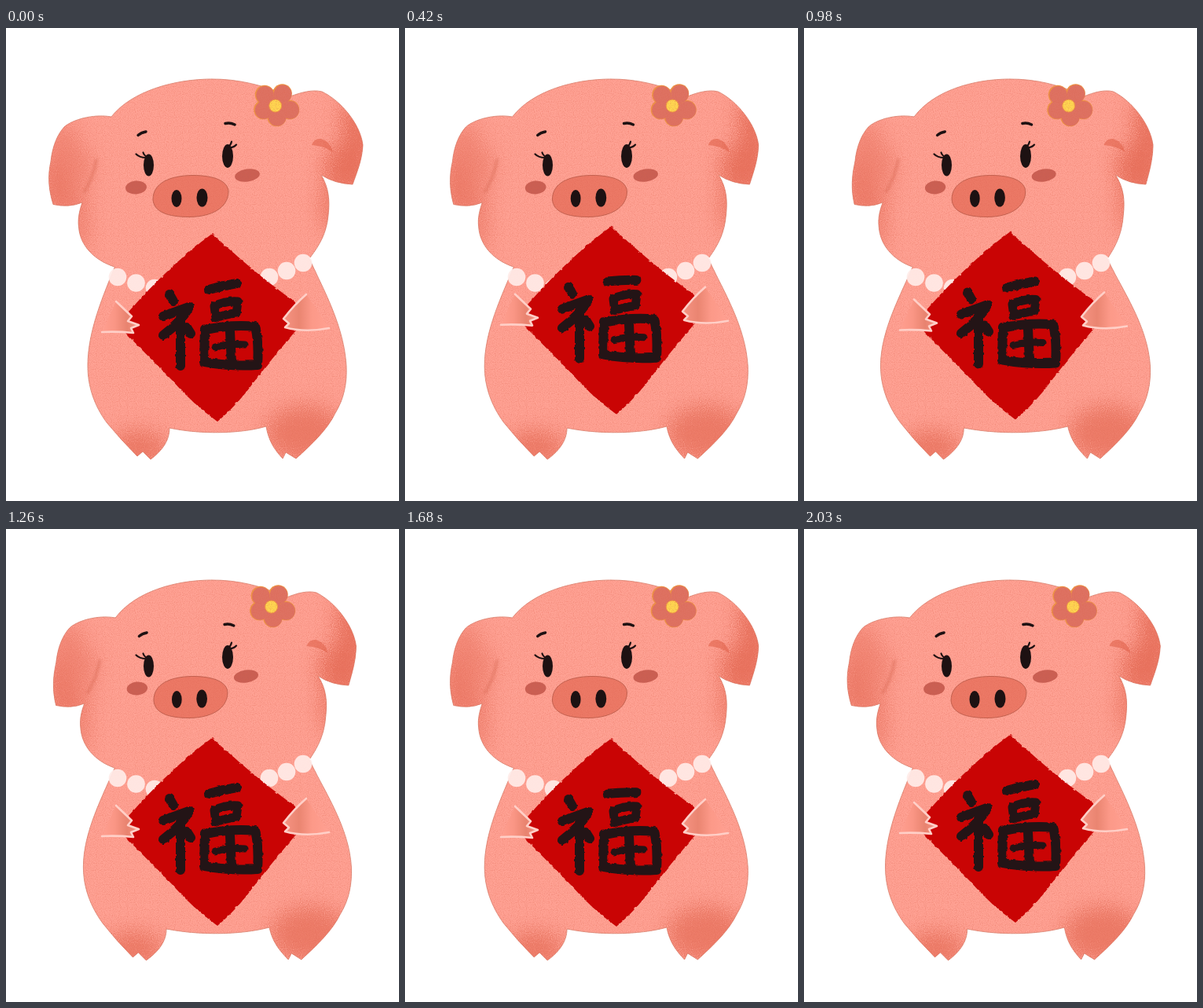
These frames come from a looping animation (500x602 px, 2.1 s). An HTML page:

```html
<!DOCTYPE html>
<html lang="zh">
<head>
<meta charset="utf-8">
<title>福</title>
<style>
  html, body { margin: 0; width: 100%; height: 100%; overflow: hidden; background: #fff; }
  svg { display: block; width: 500px; height: 602px; }
  .skin { fill: #ffa294; stroke: #dd8877; stroke-width: .9; }
  .line { fill: none; stroke-linecap: round; stroke-linejoin: round; }
  .dark { fill: #1d1112; }
  .lash { stroke: #1d1112; stroke-width: 2.2; }
  .ink { stroke: #231416; stroke-width: 12; }
  .edge { stroke: #ffcfc7; stroke-width: 2.6; }
  .shade { fill: #e2634c; }
</style>
</head>
<body>
<svg viewBox="0 0 500 602">
  <defs>
    <filter id="grain" x="0" y="0" width="500" height="602" filterUnits="userSpaceOnUse" color-interpolation-filters="sRGB">
      <feTurbulence type="fractalNoise" baseFrequency=".9" numOctaves="1" seed="4"/>
      <feColorMatrix values="0 0 0 0 .86  0 0 0 0 .38  0 0 0 0 .3  .9 0 0 0 -.39"/>
      <feComposite in2="SourceAlpha" operator="in" result="specks"/>
      <feMerge><feMergeNode in="SourceGraphic"/><feMergeNode in="specks"/></feMerge>
    </filter>
    <filter id="stipple" x="0" y="0" width="500" height="602" filterUnits="userSpaceOnUse" color-interpolation-filters="sRGB">
      <feGaussianBlur in="SourceGraphic" stdDeviation="11" result="soft"/>
      <feTurbulence type="fractalNoise" baseFrequency=".9" numOctaves="1" seed="9" result="noise"/>
      <feDisplacementMap in="soft" in2="noise" scale="60" xChannelSelector="R" yChannelSelector="G"/>
    </filter>
    <filter id="soft" x="-50%" y="-50%" width="200%" height="200%"><feGaussianBlur stdDeviation="1.6"/></filter>
    <filter id="rough" x="100" y="200" width="320" height="340" filterUnits="userSpaceOnUse" color-interpolation-filters="sRGB">
      <feTurbulence type="fractalNoise" baseFrequency=".2" numOctaves="1" seed="3"/>
      <feDisplacementMap in="SourceGraphic" scale="3.5" xChannelSelector="R" yChannelSelector="G"/>
    </filter>
    <path id="body"/>
    <path id="head"/>
    <clipPath id="inBody"><use href="#body"/></clipPath>
    <clipPath id="inHead"><use href="#head"/></clipPath>
    <linearGradient id="leftHand" x1="122" x2="168" y1="0" y2="0" gradientUnits="userSpaceOnUse">
      <stop offset="0" stop-color="#ff9f90"/><stop offset=".35" stop-color="#fa9685"/><stop offset=".7" stop-color="#e8836f"/><stop offset="1" stop-color="#f4907f"/>
    </linearGradient>
    <linearGradient id="rightHand" x1="354" x2="408" y1="0" y2="0" gradientUnits="userSpaceOnUse">
      <stop offset="0" stop-color="#f69382"/><stop offset=".35" stop-color="#ea8571"/><stop offset=".65" stop-color="#fc9988"/><stop offset="1" stop-color="#ff9f90"/>
    </linearGradient>
  </defs>

  <g filter="url(#grain)">
    <use href="#body" class="skin"/>
    <g clip-path="url(#inBody)">
      <g class="shade" filter="url(#stipple)">
        <ellipse id="legL" cx="168" cy="536" rx="38" ry="24" opacity=".6"/>
        <ellipse id="legR" cx="380" cy="516" rx="50" ry="36" opacity=".6"/>
      </g>
    </g>
    <use href="#head" class="skin"/>
    <g clip-path="url(#inHead)">
      <g class="shade" filter="url(#stipple)">
        <g id="earL">
          <path d="M50 130L84 118L96 150L112 168L98 226L50 240Z" opacity=".4"/>
          <path d="M48 170L70 165L78 232L48 238Z" opacity=".4"/>
        </g>
        <path id="earR" d="M425 92L470 110L460 212L410 200L404 168L430 140Z" opacity=".75"/>
        <ellipse cx="92" cy="252" rx="12" ry="36" opacity=".5"/>
        <ellipse cx="414" cy="228" rx="14" ry="34" opacity=".55"/>
      </g>
      <path id="foldL" class="line" d="M115 168Q111 190 100 208" stroke="#dd6f5c" stroke-width="4" opacity=".5" filter="url(#soft)"/>
      <path id="foldR" class="shade" d="M389 149Q392 140 401 141Q413 145 416 158Q405 150 389 149Z" opacity=".6"/>
    </g>
    <g class="squeeze">
      <g fill="#c95f53">
        <ellipse cx="165.500" cy="203" rx="13.500" ry="8.500" transform="rotate(-5 165.500 203)"/>
        <ellipse cx="307" cy="187.500" rx="16" ry="8" transform="rotate(-8 307 187.500)"/>
      </g>
      <path d="M187 218C187 198 207 188 237 187.500C266 187.500 283 195 283 209C282 229 262 240 234 240.500C205 240.500 188 234 187 218Z" fill="#ec7966" stroke="#c0604f"/>
    </g>
    <g id="flower"></g>
  </g>

  <g class="squeeze">
    <ellipse class="dark" cx="217" cy="217" rx="6.500" ry="11"/>
    <ellipse class="dark" cx="249.500" cy="216" rx="7" ry="11.500"/>
    <g class="line" stroke="#1d1112" stroke-width="3.400">
      <path d="M168 136.500Q172 133 178 132"/>
      <path d="M279 121.500Q285 120 291 123"/>
    </g>
  </g>
  <g id="open">
    <ellipse class="dark" cx="181.500" cy="174.500" rx="6.500" ry="14"/>
    <ellipse class="dark" cx="282" cy="163" rx="7" ry="15"/>
    <g class="line lash">
      <path d="M165.500 160.500Q170 165 178 165M174.500 158.500Q176 163 180 164"/>
      <path d="M285 152Q290 152 293 148.500M283 151Q286 149 287 144.500"/>
    </g>
  </g>
  <g id="shut" class="line lash">
    <path d="M172 183Q181 177 193 179M167 176Q171 180 177 180M173 174Q175 178 180 179M181 173L181 178"/>
    <path d="M273 167Q283 163 300 167M285 164Q289 163 289 159M290 164Q294 163 295 159M295 165Q299 165 301 162"/>
  </g>

  <g id="pearls" fill="#ffebe8" fill-opacity=".92"></g>

  <g id="sign">
    <path d="M262 262C286 283 323 317 367 348L381 371Q335 424 306 463Q288 485 269 501Q236 477 210 447Q180 417 148 384L156 361Q211 299 262 262Z" fill="#c90404" filter="url(#rough)"/>
    <g class="line ink" filter="url(#rough)">
      <path d="M208 339L213 348"/>
      <path d="M200 367L233 355Q224 373 200 391M222 372L222 430M230 381L235 389"/>
      <path id="bar" d="M258 333Q275 328 294 325"/>
      <path d="M265 354Q279 347 295 348L293 363Q280 364 267 369L265 354" stroke-width="11"/>
      <path d="M253 383L252 425M254 384Q288 377 317 380Q322 400 320 429Q285 431 252 425M285 386L287 426"/>
      <path d="M266 406Q286 401 304 403" stroke-width="9"/>
    </g>
    <path d="M122 387L140 348L160 367L155 373L169 378L159 382L162 388Z" fill="url(#leftHand)"/>
    <path class="line edge" d="M140 348L160 367L155 373L169 378L159 382L162 388Q141 386 122 387"/>
    <path d="M382 339L356 367L353 371L360 376L355 381Q380 388 411 382Z" fill="url(#rightHand)"/>
    <path class="line edge" d="M382 339Q367 352 353 370L360 376L355 381Q380 388 411 382"/>
  </g>
</svg>
<script>
const $ = id => document.getElementById(id);
const STEP = 70, COUNT = 30;

// "x~d" is a coordinate that shifts by d at full squeeze.
const HEAD = `M138 304 C111~2 295 94~3 276 92.500~3 253 C91~3 242 94~3 231 97~3.500 222
  Q80~4 229 60~4.500 224.500 C54~6 205 53~8.500 188 57~8.500 170 C59~8.500 151 65~8.500 136 74~8.500 126
  C84~8 117 110~7 109 134~6.500 113 C160~5 80 215 65 262 65 C295 65 325 72 362~-6 87
  C375~-7 82 390~-8 78 402~-9 81 C427~-10 93 451~-11 123 454~-10.700 149 C453~-10 168 447~-8 182 441~-6.500 199
  Q418~-6 198 401~-5 187 C411~-4 204 412~-4 220 410~-4 238 C408~-3.500 260 400~-2 275 387 292`;
const BODY = `M150 280 L140 300 C124~-1 340 104~-7 385 104~-7 430 C104~-7 456 112~-6 480 128~-6 502
  Q146~-7 524 167~-7 545 L174~-7 539 L184~-7 549 C200~-6 537 208~-5 524 208~-5 509
  C245 517 297 517 331~5 507 C334~6 525 341~8 536 352~9 548 L356~9 540 L369~8.500 548
  C390~8 529 409~8 511 419~8 490 C430~8 472 434~8 452 433~8 430 C430~8 380 405~1 335 388 298 L378 280`;
const LIFT = [[0, 0], [3, -5], [6, -9.300], [8, -11.300], [10, -11], [14, -2.500], [18, 4], [21, 5.300], [24, 5], [29, 0], [30, 0]];

const morph = (path, p) => path.replace(/([\d.]+)~(-?[\d.]+)/g, (_, x, d) => (+x + d * p).toFixed(2));
const circle = (x, y, r, more = '') => `<circle cx="${x}" cy="${y}" r="${r}" ${more}/>`;
const shift = (id, x, y = 0) => $(id).setAttribute('transform', `translate(${x.toFixed(2)} ${y.toFixed(2)})`);

function lookup(table, f) {
  const i = table.findIndex(k => k[0] > f);
  const [a, u] = table[i - 1], [b, v] = table[i];
  return u + (v - u) * (f - a) / (b - a);
}

$('pearls').innerHTML = [[142, 317], [165.500, 324.500], [189, 331], [335, 317], [357, 309], [378, 299]]
  .map(([x, y]) => circle(x, y, 11.300)).join('');

const petals = [[329, 85], [351.500, 83.500], [361, 104], [344.500, 113], [327.500, 104]];
$('flower').innerHTML =
  petals.map(([x, y]) => circle(x, y, 12.300, 'fill="#ee9545"')).join('') +
  petals.map(([x, y]) => circle(x + .6, y + .4, 11.300, 'fill="#de7262"')).join('') +
  circle(343, 99, 12, 'fill="#de7262"') + circle(342.700, 99, 8, 'fill="#ffd850" stroke="#ee9545"');

function draw(f) {
  const p = 1 - Math.abs(f - 15) / 15;
  $('head').setAttribute('d', morph(HEAD, p));
  $('body').setAttribute('d', morph(BODY, p));
  const k = 1 - .026 * p;
  for (const part of document.querySelectorAll('.squeeze'))
    part.setAttribute('transform', `translate(${(232 * (1 - k)).toFixed(2)} 0) scale(${k.toFixed(4)} 1)`);
  shift('flower', -6.400 * p);
  shift('earL', 7 * p);
  shift('foldL', 5 * p);
  shift('earR', -9 * p);
  shift('foldR', -8 * p);
  shift('legL', -7 * p);
  shift('legR', 8 * p);
  shift('sign', 0, lookup(LIFT, f));
  const flat = f > 3 && f < 8 || f > 21 && f < 27;
  $('bar').setAttribute('transform', flat ? 'translate(0 2) rotate(10 276 329)' : '');
  const blink = f >= 9 && f <= 11;
  $('open').style.display = blink ? 'none' : '';
  $('shut').style.display = blink ? '' : 'none';
}

const start = performance.now();
let last = 0;
draw(0);
function tick() {
  const f = Math.floor(Math.max(0, performance.now() - start) / STEP) % COUNT;
  if (f !== last) draw(last = f);
  requestAnimationFrame(tick);
}
requestAnimationFrame(tick);
</script>
</body>
</html>
```
